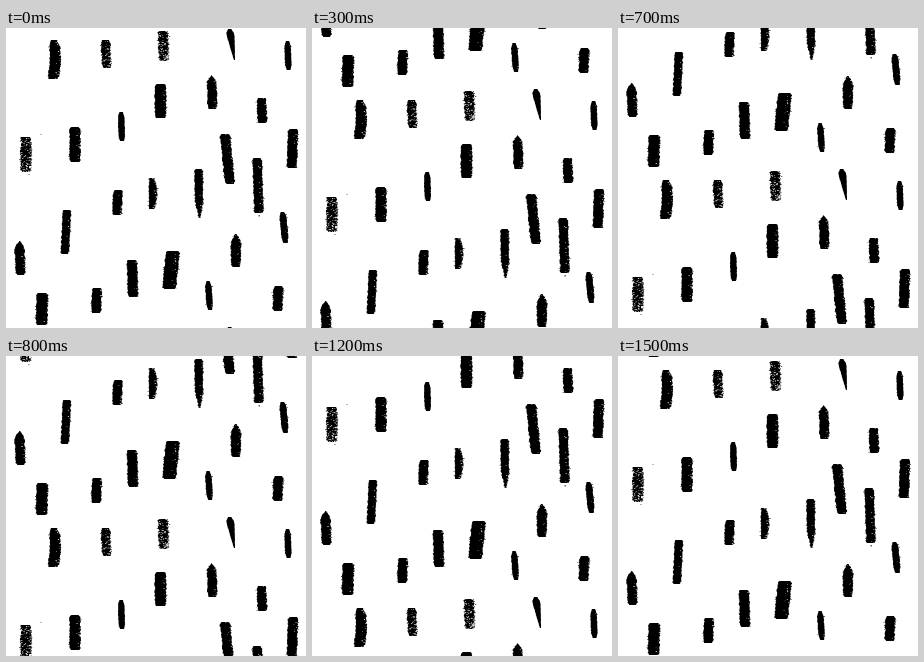
An HTML page with a canvas that plays this animation: 300 by 300 pixels, repeating every 1.6 s.

```html
<!DOCTYPE html>
<html lang="en">
<head>
<meta charset="utf-8">
<title>Falling brush strokes</title>
<style>
  html, body { margin: 0; width: 100%; height: 100%; overflow: hidden; background: #fff; }
  body { position: relative; }
  canvas {
    position: absolute; left: 0; top: -596px;
    animation: fall 1600ms steps(16) infinite;
  }
  @keyframes fall { to { transform: translateY(320px); } }
</style>
</head>
<body>
<canvas id="strokes" width="300" height="1192"></canvas>
<script>
const TILE = 298;
const ctx = document.getElementById('strokes').getContext('2d');

// kind, centre x, top, height, width, lean
const strokes = [
  ['b', 48.5, 12, 39, 11, -1], ['g', 100, 12, 28, 9, 1], ['G', 157.5, 3, 30, 10, 1],
  ['v', 226, 1, 31, 7.5, 5], ['s', 282, 13, 29, 6.5, 1], ['r', 154.5, 56, 34, 11.5],
  ['p', 206, 47, 34, 9.5, 1], ['r', 256, 70, 25, 9.5, 1], ['s', 115.5, 84, 29, 6.5, 1],
  ['r', 69, 99, 35, 11, 0], ['G', 20, 109, 35, 10.5, 0], ['r', 221.5, 106, 50, 10, 5],
  ['r', 286.5, 101, 39, 10, -1], ['t', 193, 141, 49, 8.5, 1], ['r', 252, 130, 55, 9.5, 2],
  ['r', 111.5, 162, 25, 9.5, -1], ['c', 146.5, 150, 31, 8.5, 0], ['r', 60, 182, 44, 8.5, -2],
  ['s', 278, 184, 31, 7, 3], ['p', 14, 213, 34, 10, 1], ['p', 230, 206, 33, 10, 0],
  ['r', 126.5, 232, 37, 10.5, 1], ['r', 165, 223, 38, 14, -4], ['s', 203, 253, 29, 6.5, 2],
  ['r', 36, 265, 32, 11.5, -1], ['r', 90.5, 260, 25, 10, -1], ['r', 272, 258, 25, 10, -1]
];

function seeded(seed) {
  let a = seed * 7919 + 17;
  return () => {
    a = (a + 0x6D2B79F5) | 0;
    let t = Math.imul(a ^ (a >>> 15), 1 | a);
    t = (t + Math.imul(t ^ (t >>> 7), 61 | t)) ^ t;
    return ((t ^ (t >>> 14)) >>> 0) / 4294967296;
  };
}

function profile(kind, u, y, h) {
  const cap = (d, len, low) => Math.min(1, low + (1 - low) * d / len);
  const ends = cap(y, 2, .75) * cap(h - y, 2, .75);
  switch (kind) {
    case 'v': return cap(y, 4, .45) * (1 - .85 * Math.max(0, u - .25) / .75);
    case 's': return cap(y, 5, .5) * cap(h - y, 5, .6);
    case 'p': return cap(y, 7, .1) * cap(h - y, 3, .7);
    case 't': return ends * cap(h - y, 16, .15);
    case 'c': return .6 + .4 * Math.sin(Math.PI * u);
    case 'b': return cap(y, 7, .5) * cap(h - y, 3, .8);
    default: return ends;
  }
}

const roughness = { v: .4, s: .6, g: 1.6, G: 2 };
const grain = { v: 0, s: .01, g: .22, G: .38, c: .1, b: .06 };

function dot(x, y, size, color) {
  ctx.fillStyle = color;
  ctx.fillRect(x, y, size, size);
}

function drawStroke([kind, x, top, h, w, lean = 0], index, shift) {
  const rnd = seeded(index + 1);
  const rough = roughness[kind] ?? 1.3;
  const bow = kind === 'b' || kind === 'c' ? 1.5 : 0;
  const left = [], right = [];
  const middle = u => x + lean * (u - .5) + bow * (Math.sin(Math.PI * u) - .5);

  for (let y = 0; y <= h; y++) {
    const u = y / h, half = w / 2 * profile(kind, u, y, h);
    left.push([middle(u) - half + (rnd() - .5) * rough, top + shift + y]);
    right.push([middle(u) + half + (rnd() - .5) * rough, top + shift + y]);
  }

  ctx.fillStyle = '#000';
  ctx.beginPath();
  for (const p of [...left, ...right.reverse()]) ctx.lineTo(...p);
  ctx.fill();
  right.reverse();

  // Dry-brush flecks, denser towards the right and the lower end
  const flecks = w * h * (grain[kind] ?? .03);
  for (let i = 0; i < flecks; i++) {
    const row = Math.floor((1 - rnd() ** 1.3) * h);
    const [l, y] = left[row], r = right[row][0];
    const across = kind === 'G' || kind === 'g' ? 1 - rnd() ** 1.7 : 1 - rnd() ** 2 * .4;
    dot(l + (r - l) * across - .4, y, .5 + rnd() * .7, `rgba(255,255,255,${.4 + rnd() * .5})`);
  }

  // Loose crumbs along the edges
  const crumbs = kind === 'v' ? 0 : h * rough * .22;
  for (let i = 0; i < crumbs; i++) {
    const side = rnd() < .5 ? left : right;
    const [ex, y] = side[Math.floor(rnd() * h)];
    dot(ex - .4 + (rnd() - .5) * 1.6, y, .5 + rnd() * .5, 'rgba(0,0,0,.75)');
  }
}

for (let shift = 0; shift < 4 * TILE; shift += TILE) {
  strokes.forEach((s, i) => drawStroke(s, i, shift));
  dot(34.5, shift + 106, 1, '#777');
  dot(22.5, shift + 146, 1, '#555');
  dot(252.5, shift + 187, 1.5, '#666');
}
</script>
</body>
</html>
```
